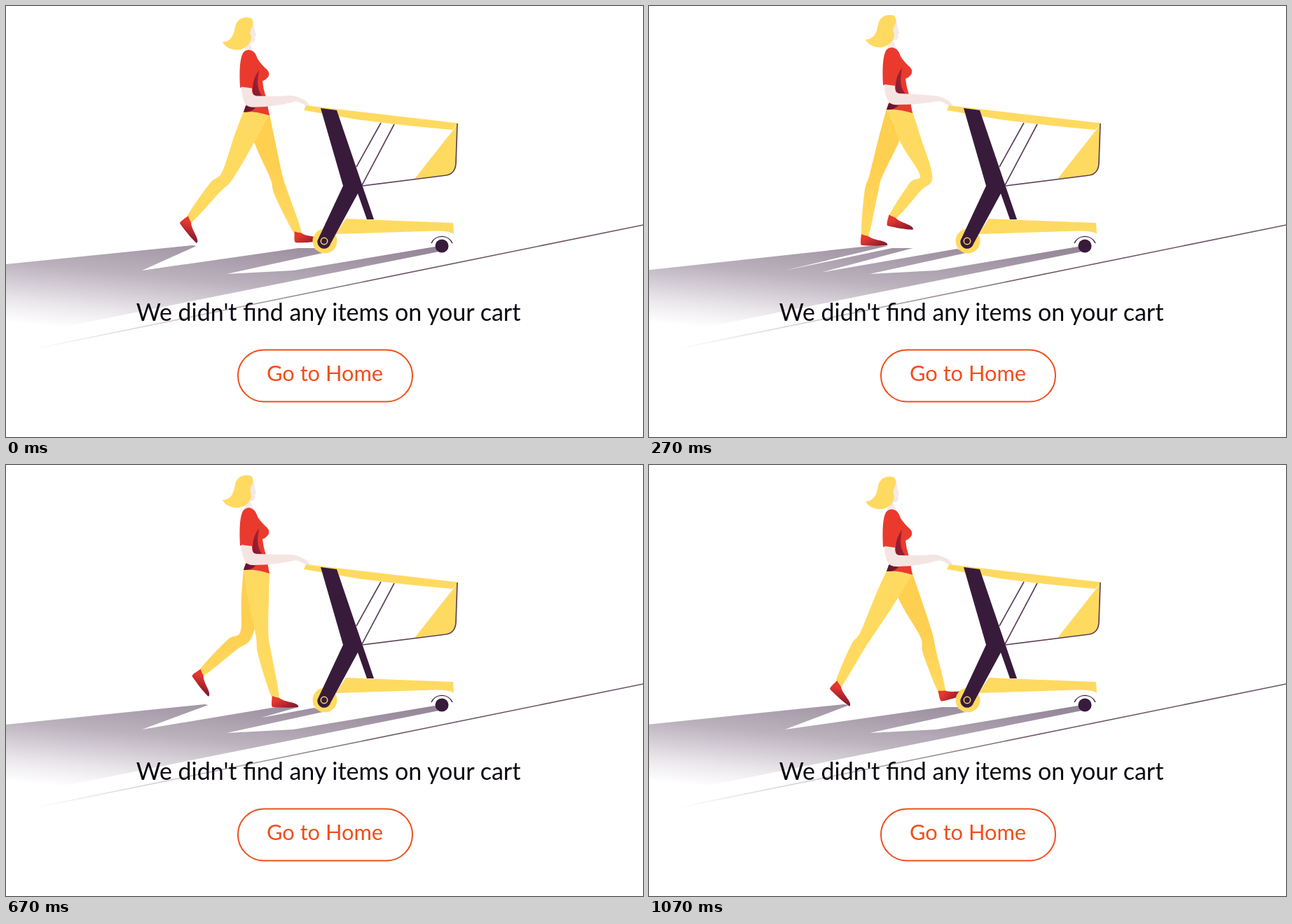
Animation of 909 by 616 pixels, one loop 1140 ms. Source, as an HTML page:

```html
<!DOCTYPE html>
<html lang="en">
<head>
<meta charset="utf-8">
<title>Empty cart</title>
<style>
  html, body { margin: 0; width: 100%; height: 100%; overflow: hidden; background: #fff; }
  svg { display: block; width: 909px; height: 616px; }
  text { font-family: Lato, sans-serif; text-anchor: middle; }
</style>
</head>
<body>
<svg viewBox="0 0 909 616">
  <defs>
    <linearGradient id="shade" gradientUnits="userSpaceOnUse" x1="0" y1="280" x2="-17" y2="450">
      <stop offset="0" stop-color="#3a1e40" stop-opacity=".56"/>
      <stop offset=".5" stop-color="#3a1e40" stop-opacity=".34"/>
      <stop offset=".82" stop-color="#3a1e40" stop-opacity=".1"/>
      <stop offset="1" stop-color="#3a1e40" stop-opacity="0"/>
    </linearGradient>
    <linearGradient id="floor" gradientUnits="userSpaceOnUse" x1="40" y1="0" x2="560" y2="0">
      <stop offset="0" stop-color="#6b5564" stop-opacity="0"/>
      <stop offset=".45" stop-color="#6b5564" stop-opacity=".4"/>
      <stop offset="1" stop-color="#6b5564"/>
    </linearGradient>
    <linearGradient id="farSkin" gradientUnits="userSpaceOnUse" x1="0" y1="230" x2="0" y2="310">
      <stop offset="0" stop-color="#ffcf50"/>
      <stop offset="1" stop-color="#ffd95f"/>
    </linearGradient>
    <linearGradient id="leather" x1="0" y1="0" x2="1" y2=".7">
      <stop offset=".3" stop-color="#e5372e"/>
      <stop offset="1" stop-color="#8a1a30"/>
    </linearGradient>
    <linearGradient id="fold" x1="0" y1="1" x2="1" y2="0">
      <stop offset="0" stop-color="#5c1233"/>
      <stop offset="1" stop-color="#b3242f"/>
    </linearGradient>
    <path id="shoe" fill="url(#leather)"
      d="M-5-3C-1-1 3-1 5 0C10 4 18 5 25 7C31 9 33 11 32 13C22 14 8 14-4 13C-7 13-6 5-5-3Z"/>
  </defs>

  <path id="shadow" fill="url(#shade)"/>
  <path d="M40 490L909 313" stroke="url(#floor)" stroke-width="1.6"/>

  <path id="farLeg" fill="url(#farSkin)"/>
  <use id="farShoe" href="#shoe"/>
  <path id="nearLeg" fill="#ffda61"/>
  <use id="nearShoe" href="#shoe"/>

  <g id="torso">
    <path fill="#f5e9e8" d="M349 18L353 22L355 33L357 41L355 44L356 48L353 52L348 52L353 64L340 64L344 40Z"/>
    <path fill="#ffda61" d="M350 17C340 13 329 18 327 29C325 42 320 51 309 51C313 59 323 63 333 62C345 59 350 51 350 43C347 38 349 32 351 30C353 25 353 20 350 17Z"/>
    <path fill="#ea3a2e" d="M343 63Q347 61 352 64Q356 66 359 75Q364 83 373 91Q377 96 374 101Q371 105 366 107Q367 118 371 130L376 156Q358 150 339 151L343 140L346 117L334 116Q332 82 337 69Q339 64 343 63Z"/>
    <path fill="url(#fold)" d="M361 91Q352 103 352 118L353 128L366 129Q359 120 359 108ZM342 142L356 145Q350 152 339 151Z"/>
  </g>
  <path id="arm" fill="#f4e5e3"/>

  <g id="cart">
    <path fill="#ffda61" d="M428 142L645 167.500L637 177Q560 170.500 500 162L425 149ZM485 304L638 310L639 326Q634 321 610 321.500L470 326Z"/>
    <path fill="#ffda61" d="M639 176L583 247L628 242Q642 238 642 225L644 168Z"/>
    <path fill="none" stroke="#5e4258" stroke-width="1.7" d="M644 168L642 225Q641 240 628 242L509 257M535 167L500 230M554 169L508 256"/>
    <circle cx="455" cy="336" r="17.500" fill="#ffda61"/>
    <path fill="#381b3b" d="M449 146L472 149L509 258L525 305L515 305L502 268L463 340A9.500 9.500 0 1 1 446 332L481 257Z"/>
    <circle cx="454" cy="336" r="4.700" fill="none" stroke="#ffda61" stroke-width="1.5"/>
    <circle cx="622" cy="343" r="9.500" fill="#381b3b"/>
    <path fill="none" stroke="#381b3b" stroke-width="1.4" d="M607 339A16.500 16.500 0 0 1 637 339"/>
  </g>

  <text x="460" y="450" font-size="34" fill="#0b0610">We didn't find any items on your cart</text>
  <rect x="331" y="491.500" width="249" height="74" rx="37" fill="none" stroke="#f04e1c" stroke-width="2"/>
  <text x="455" y="536" font-size="30.800" fill="#f04e1c">Go to Home</text>
</svg>

<script>
const LOOP = 1140, POSES = 14, KNEE_Y = 243;

// Key poses of one stride: phase, knee x, ankle x, ankle y, shoe angle
const keys = [
  [0, 316, 261, 306, 50],
  [2, 375, 308, 292, 44],
  [3, 396, 347, 302, 9],
  [5, 402, 407, 322, -24],
  [7, 386, 417, 325, -4],
  [8, 366, 385, 333, 0],
  [10, 324, 308, 329, 0],
  [12, 313, 288, 321, 28]
];

const $ = id => document.getElementById(id);
const set = (id, name, value) => $(id).setAttribute(name, value);
const mix = (a, b, f) => [a[0] + (b[0] - a[0]) * f, a[1] + (b[1] - a[1]) * f];
const add = (p, n, s) => [p[0] + n[0] * s, p[1] + n[1] * s];

function unit([x, y]) {
  const len = Math.hypot(x, y);
  return [x / len, y / len];
}

// Unit vector towards the front of a limb running from a to b
const front = (a, b) => unit([b[1] - a[1], a[0] - b[0]]);

// Key pose n, counted endlessly through the strides
function keyAt(n) {
  const turns = Math.floor(n / keys.length);
  const [phase, ...pose] = keys[n - turns * keys.length];
  return { at: phase + turns * POSES, pose };
}

// Cubic interpolation between the key poses
function legPose(phase) {
  const n = keys.findLastIndex(key => key[0] <= phase);
  const [a, b, c, d] = [-1, 0, 1, 2].map(step => keyAt(n + step));
  const span = c.at - b.at, u = (phase - b.at) / span;
  return b.pose.map((from, j) => {
    const to = c.pose[j];
    const m1 = (to - a.pose[j]) / (c.at - a.at) * span;
    const m2 = (d.pose[j] - from) / (d.at - b.at) * span;
    return from + (to - from) * u * u * (3 - 2 * u)
      + m1 * u * (1 - u) ** 2 - m2 * u * u * (1 - u);
  });
}

function smooth(pts) {
  let d = "M" + pts[0];
  for (let i = 0; i < pts.length - 1; i++) {
    const p = pts[i], q = pts[i + 1];
    const before = pts[i - 1] || p, after = pts[i + 2] || q;
    const c1 = add(p, [q[0] - before[0], q[1] - before[1]], 1 / 6);
    const c2 = add(q, [p[0] - after[0], p[1] - after[1]], 1 / 6);
    d += "C" + [c1, c2, q].join(" ");
  }
  return d + "Z";
}

// Draws one leg and returns where its foot is
function drawLeg(side, phase, dy) {
  const [kx, ax, ay, turn] = legPose(phase % POSES);
  const hip = [357, 154 + dy], knee = [kx, KNEE_Y], ankle = [ax, ay];
  const n1 = front(hip, knee), n2 = front(knee, ankle);
  const nk = unit([n1[0] + n2[0], n1[1] + n2[1]]);
  const rib = (p, n, ahead, behind) => [add(p, n, ahead), add(p, n, -behind)];
  const ribs = [
    rib(mix(hip, knee, .45), n1, 14, 15),
    rib(knee, nk, 8.5, 9.5),
    rib(mix(knee, ankle, .3), n2, 7, 12),
    rib(ankle, n2, 5, 5)
  ];
  set(side + "Leg", "d", smooth([
    [376, 154 + dy], ...ribs.map(r => r[0]),
    ...ribs.map(r => r[1]).reverse(), [339, 150 + dy]
  ]));
  set(side + "Shoe", "transform", `translate(${ax} ${ay}) rotate(${turn})`);
  const angle = turn * Math.PI / 180;
  return { ankle: ax, toe: ax + 32 * Math.cos(angle) - 13 * Math.sin(angle) };
}

function drawArm(dy) {
  const y = v => v + dy;
  set("arm", "d", `M336 ${y(115)}L351 ${y(117)}Q350 ${y(127)} 357 ${y(128)}`
    + `Q382 ${y(129)} 405 128Q413 128 423 133Q431 136 433 143L427 142Q422 138 414 136`
    + `Q384 ${y(144)} 355 ${y(144)}Q344 ${y(145)} 340 ${y(137)}Q336 ${y(127)} 336 ${y(115)}Z`);
}

// Beams run back from each foot and both wheels; gaps close as feet near the wheel
function drawShadow(feet) {
  const [rear, lead] = feet.sort((a, b) => a.ankle - b.ankle);
  const left = 369 + (rear.toe - 272) * .12;
  const gap = lead.toe - Math.max(0, 445 - lead.toe) * 1.9;
  set("shadow", "d", `M0 ${left}L${(rear.ankle + rear.toe) / 2} 342 ${rear.toe} 343 194 378`
    + ` ${lead.ankle} 346 ${lead.toe} 346 ${gap} ${383 - (gap - 232) * .165}`
    + " 440 347 452 353 315 383 410 378 612 344 628 349 0 475Z");
}

// Even ticks, with every sixth one holding the pose before it
function poseAt(time) {
  const tick = Math.floor((time + 8) / 66.7);
  return Math.min(POSES - 1, tick - Math.floor((tick + 3) / 6));
}

let shown = -1;
function draw(time) {
  const pose = poseAt(time);
  if (pose === shown) return;
  shown = pose;
  const dy = 2 * Math.cos((pose + .8) / 7 * 2 * Math.PI) - 1;
  drawShadow([drawLeg("far", pose + 7, dy), drawLeg("near", pose, dy)]);
  drawArm(dy);
  set("torso", "transform", `translate(0 ${dy})`);
}

const begin = performance.now();
function frame() {
  draw((performance.now() - begin) % LOOP);
  requestAnimationFrame(frame);
}
frame();
</script>
</body>
</html>
```
